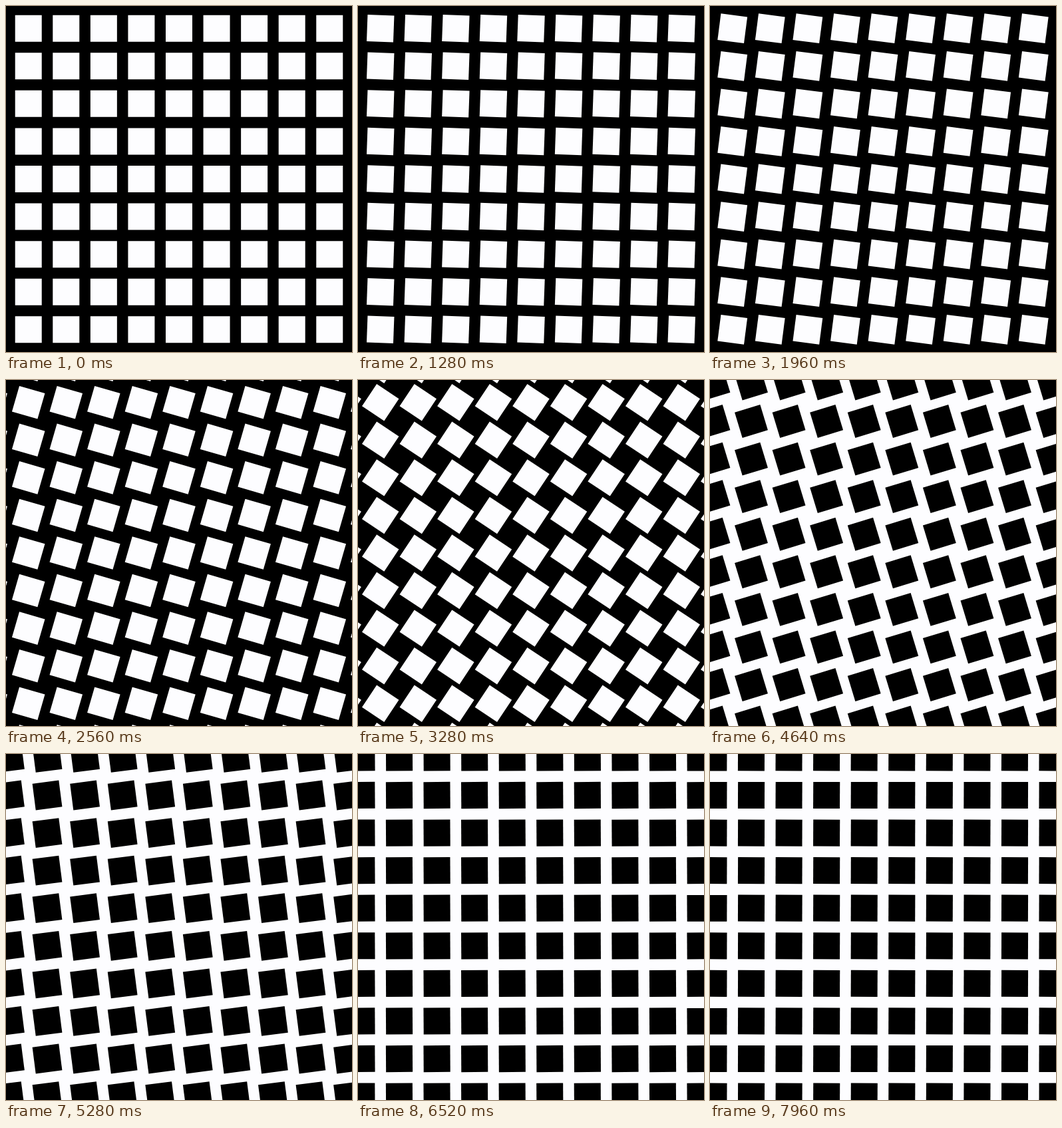
An HTML page with a canvas for the animation above (8000 ms loop, 520x520 px).

```html
<!DOCTYPE html>
<html lang="en">
<head>
<meta charset="utf-8">
<title>Turning squares</title>
<style>
html, body { margin: 0; width: 100%; height: 100%; overflow: hidden; background: #000; }
canvas { display: block; }
</style>
</head>
<body>
<canvas id="stage" width="520" height="520"></canvas>
<script>
const ctx = document.getElementById('stage').getContext('2d');
const LIGHT = '#fdfdff', DARK = '#000';
const STAGE = 520, SIDE = 40, PITCH = SIDE * Math.SQRT2;
const LOOP = 8000, STEP = 40, LEAD = 40, TURN = 7320;

const ease = u => u < 0.5 ? 4 * u ** 3 : 1 - 4 * (1 - u) ** 3;

function drawGrid(fill, back, shift, angle) {
  ctx.setTransform(1, 0, 0, 1, 0, 0);
  ctx.fillStyle = back;
  ctx.fillRect(0, 0, STAGE, STAGE);
  ctx.fillStyle = fill;
  const c = Math.cos(angle), s = Math.sin(angle);
  for (let row = -6; row <= 6; row++) {
    for (let col = -6; col <= 6; col++) {
      ctx.setTransform(c, s, -s, c,
        STAGE / 2 + (col + shift) * PITCH,
        STAGE / 2 + (row + shift) * PITCH);
      ctx.fillRect(-SIDE / 2, -SIDE / 2, SIDE, SIDE);
    }
  }
}

// At 45 degrees the corners touch, so the gaps become the squares.
function draw(time) {
  const turns = (time + LEAD) / TURN;
  const u = turns % 1;
  const swapped = (turns >= 1) !== (u >= 0.5);
  const angle = ease(u) * Math.PI / 2;
  if (swapped) drawGrid(DARK, LIGHT, 0.5, angle);
  else drawGrid(LIGHT, DARK, 0, angle);
}

function tick(now) {
  draw(Math.floor((now % LOOP) / STEP) * STEP);
  requestAnimationFrame(tick);
}
draw(0);
requestAnimationFrame(tick);
</script>
</body>
</html>
```
